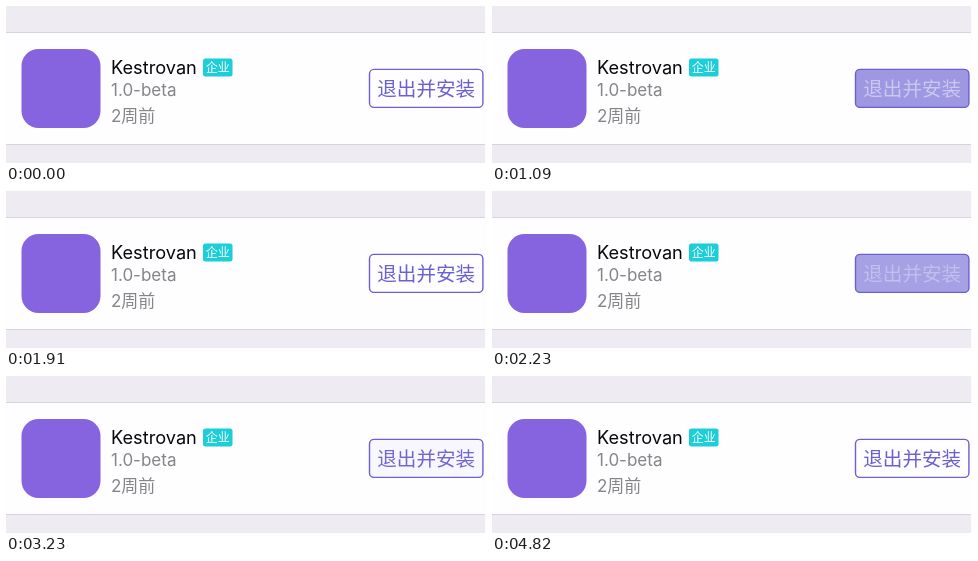
These frames come from a looping animation (480 px wide and 157 px high, 4.87 s). An HTML page:

```html
<!DOCTYPE html>
<html lang="zh-CN">
<head>
<meta charset="utf-8">
<title>App row with install button</title>
<style>
  html, body { margin: 0; width: 100%; height: 100%; overflow: hidden; background: #eeebf3; }
  svg { display: block; width: 100%; height: 100%; }
  text { font-family: Inter, "Noto Sans CJK SC", "Noto Sans CJK", sans-serif; }
  .meta { font-size: 17px; fill: #858488; }
  .badge { font-size: 12px; font-weight: 500; fill: #fff; text-anchor: middle; }
  .label { font-size: 19.6px; text-anchor: middle; }
</style>
</head>
<body>
<svg viewBox="0 0 480 157">
  <rect y="26" width="479" height="113" fill="#d6d3db"/>
  <rect y="27" width="479" height="111" fill="#fefdff"/>
  <rect x="479" width="1" height="157" fill="#fdfcfe"/>

  <rect x="15.5" y="43" width="79" height="79" rx="17" fill="#8663df"/>
  <text x="105" y="68" font-size="18.2" fill="#09090b">Kestrovan</text>
  <rect x="197" y="52.5" width="29.5" height="18" rx="2.5" fill="#1bced8"/>
  <text class="badge" x="211.7" y="66">企业</text>
  <text class="meta" x="105" y="90">1.0-beta</text>
  <text class="meta" x="105" y="116">2周前</text>

  <g fill="#6b60d3">
    <rect x="363.5" y="63.4" width="113.4" height="38" rx="4.5" fill="none" stroke="#6b60d3" stroke-width="1.4"/>
    <rect id="fill" x="363.5" y="63.4" width="113.4" height="38" rx="4.5"/>
    <text id="label" class="label" x="420.2" y="90">退出并安装</text>
  </g>
</svg>
<script>
  const LOOP = 4870;
  const TAPS = 5, FIRST_DOWN = 127, PERIOD = 679, HOLD = 196;
  const FADE_IN = 120, FADE_OUT = 220;
  const PURPLE = [107, 96, 211];
  const fill = document.getElementById('fill');
  const label = document.getElementById('label');

  const ease = x => (1 - Math.cos(Math.PI * Math.min(1, Math.max(0, x)))) / 2;

  // Pressed amount: 0 is the outlined button, 1 the filled one.
  function pressed(t) {
    const tap = Math.min(TAPS - 1, Math.floor((t - FIRST_DOWN) / PERIOD));
    const age = t - FIRST_DOWN - tap * PERIOD;
    return tap < 0 ? 0 : ease(age / FADE_IN) - ease((age - HOLD) / FADE_OUT);
  }

  function draw(t) {
    const amount = pressed(t);
    fill.setAttribute('opacity', amount);
    label.setAttribute('fill', `rgb(${PURPLE.map(c => Math.round(c + (255 - c) * amount))})`);
  }

  const start = performance.now();
  function tick() {
    draw((performance.now() - start) % LOOP);
    requestAnimationFrame(tick);
  }
  tick();
</script>
</body>
</html>
```
